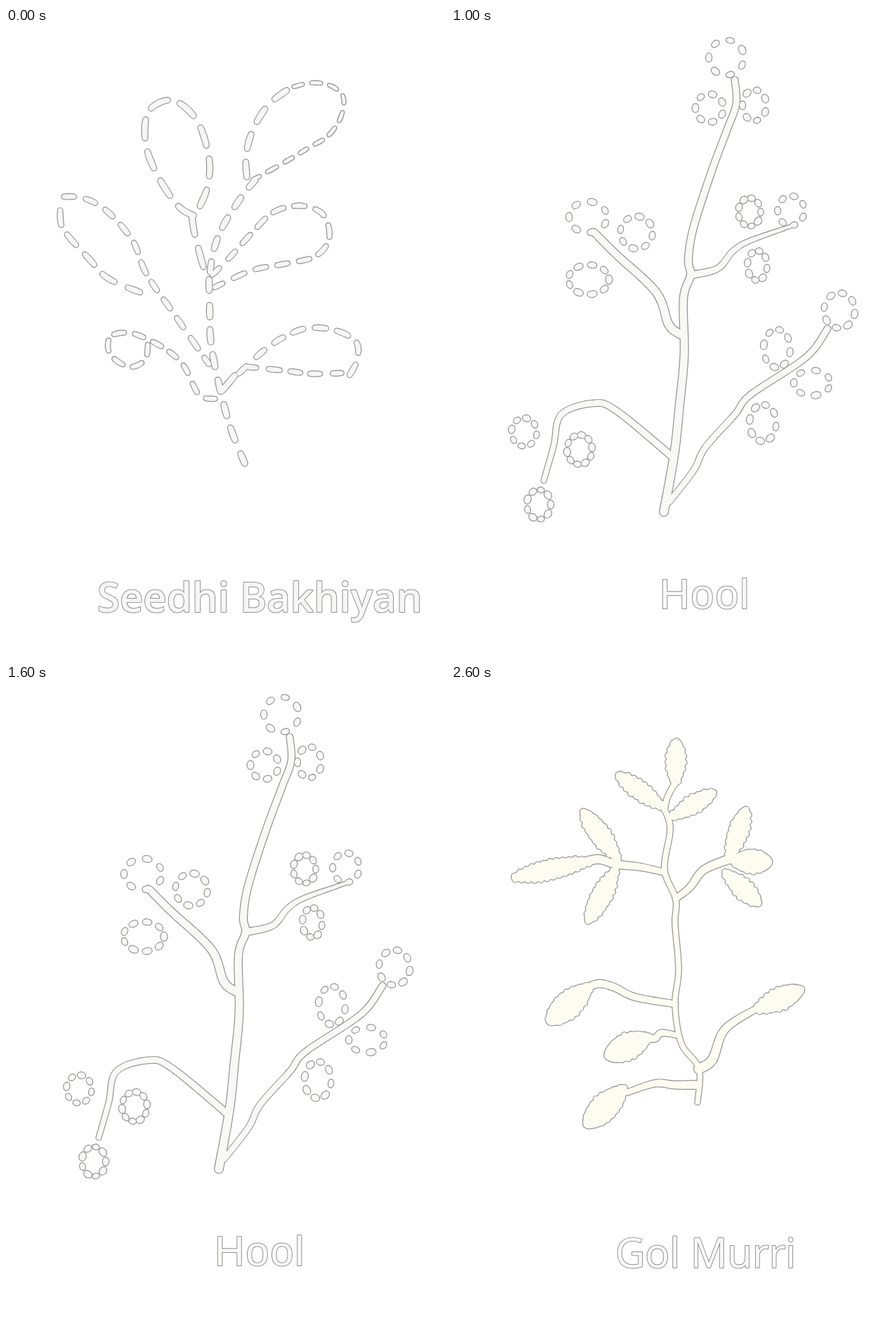
Animation, 625 px wide and 895 px high, one loop 3000 ms. Source, as an HTML page with a canvas:

```html
<!DOCTYPE html>
<html lang="en">
<head>
<meta charset="utf-8">
<title>Embroidery stitches</title>
<style>
  html, body { margin: 0; width: 100%; height: 100%; overflow: hidden; background: #fff; }
  canvas { display: block; }
</style>
</head>
<body>
<canvas width="625" height="895"></canvas>
<script>
const ctx = document.querySelector('canvas').getContext('2d');
const OUTLINE = '#929295';
let shapes = [];  // each shape is a list of discs [x, y, r]
let seed = 1;

const random = () => (seed = seed * 16807 % 2147483647) / 2147483647;
const mix = (a, b, t) => a + (b - a) * t;
const spline = (a, b, c, d, t) =>
  b + t / 2 * (c - a + t * (2 * a - 5 * b + 4 * c - d + t * (3 * (b - c) + d - a)));

// Points about one pixel apart on a smooth curve through "x y x y ..." knots.
function curve(text) {
  const values = text.split(/\s+/).map(Number), knots = [], points = [];
  for (let i = 0; i < values.length; i += 2) knots.push([values[i], values[i + 1]]);
  for (let i = 0; i + 1 < knots.length; i++) {
    const b = knots[i], c = knots[i + 1], a = knots[i - 1] || b, d = knots[i + 2] || c;
    const steps = Math.ceil(Math.hypot(c[0] - b[0], c[1] - b[1]));
    for (let s = 0; s < steps; s++) {
      points.push([0, 1].map(k => spline(a[k], b[k], c[k], d[k], s / steps)));
    }
  }
  return points;
}

function limb(from, to, text) {
  shapes.push(curve(text).map(([x, y], i, all) => [x, y, mix(from, to, i / all.length)]));
}

// Evenly spaced oval stitches that fill the whole curve.
function stitches(count, r, text) {
  const points = curve(text), gap = 0.25, period = points.length / (count - gap);
  for (let i = 0; i < count; i++) {
    const dash = points.slice(Math.round(i * period + r), Math.round((i + 1 - gap) * period - r) + 1);
    shapes.push(dash.map(([x, y], j) => [x, y, r * (0.88 + 0.12 * Math.sin(Math.PI * j / dash.length))]));
  }
}

// Seeds of slightly uneven size along an ellipse.
function ring(count, cx, cy, rx, ry) {
  for (let i = 0; i < count; i++) {
    const size = mix(4.1, 5.2, random()), seedShape = [];
    for (let k = -1; k <= 1; k += 0.25) {
      const angle = (i + 0.25) / count * 2 * Math.PI - Math.PI / 2 + k * 0.1;
      seedShape.push([cx + rx * Math.cos(angle), cy + ry * Math.sin(angle), size - Math.abs(k) * 0.7]);
    }
    shapes.push(seedShape);
  }
}

// A leaf from base to tip, widest past the middle, with a bumpy edge.
function leaf(x1, y1, x2, y2, width) {
  const length = Math.hypot(x2 - x1, y2 - y1), nx = (y1 - y2) / length, ny = (x2 - x1) / length;
  const discs = [];
  for (let s = 0; s <= length; s++) {
    const t = s / length, x = mix(x1, x2, t), y = mix(y1, y2, t);
    const r = mix(4.5, width, Math.sin(Math.PI * t ** 1.15) ** 0.8);
    discs.push([x, y, r]);
    if (s % 9 === 4) {
      for (const side of [-1, 1]) {
        const reach = side * (r - 3.5 + random() * 1.8);
        discs.push([x + nx * reach, y + ny * reach, 4.3]);
      }
    }
  }
  shapes.push(discs);
}

// All outlines first, then all fills, so that touching shapes merge.
function paint(fill) {
  for (const [color, grow] of [[OUTLINE, 0.6], [fill, -0.6]]) {
    ctx.fillStyle = color;
    for (const discs of shapes) {
      const path = new Path2D();
      for (const [x, y, r] of discs) {
        path.moveTo(x + r + grow, y);
        path.arc(x, y, r + grow, 0, 2 * Math.PI);
      }
      ctx.fill(path);
    }
  }
}

function label(text, x, y, font, fill, spacing = 0) {
  ctx.font = font;
  ctx.letterSpacing = spacing + 'px';
  ctx.lineJoin = 'round';
  ctx.lineWidth = 2;
  ctx.strokeStyle = OUTLINE;
  ctx.strokeText(text, x, y);
  ctx.fillStyle = fill;
  ctx.fillText(text, x, y);
}

function seedhiBakhiyan() {
  stitches(2, 4.6, '282 343 275 318 268 290 264 264');
  stitches(9, 4.6, '270 268 246 254 217 212 199 165 203 119 237 103 272 132 289 185 287 225 275 256');
  stitches(5, 4.6, '290 350 296 315 310 280 337 238 357 214');
  stitches(4, 4.6, '343 215 342 180 352 144 373 110 402 87');
  stitches(11, 3.1, '408 84 435 78 462 82 480 98 477 126 459 153 430 171 395 192 350 217');
  stitches(14, 3.9, '292 353 318 327 347 295 381 262 420 253 452 266 460 300 440 325 400 335 350 345 295 370');
  stitches(11, 4.1, '80 240 110 242 143 260 180 302 200 350 240 408 290 480');
  stitches(5, 4.3, '77 257 79 281 92 300 118 328 145 356 193 377');
  stitches(11, 3.8, '202 448 198 472 175 482 148 464 149 439 177 434 208 446 233 461 254 482 275 522 300 528');
  stitches(8, 4.2, '330 493 367 459 397 439 430 427 468 430 498 446 500 472 488 496');
  stitches(5, 4, '480 491 435 492 400 488 342 482');
  stitches(8, 4.8, '289 355 290 400 292 450 305 515 320 570 341 622');
  stitches(1, 4.8, '328 492 305 519');
  paint('#f6f6f4');
  label('Seedhi Bakhiyan', 130, 831, '600 58px "Open Sans", sans-serif', '#f6f6f4');
}

function hool() {
  limb(5, 6.5, '404 74 406 108 393 145 371 204 345 285 338 330 341 352 331 385 332 465 325 540 318 605 303 689');
  limb(5.5, 2.8, '345 351 380 342 401 318 425 303 484 282');
  limb(5.5, 6.5, '205 292 235 322 292 376 310 422 327 436');
  limb(4, 5.5, '132 644 146 595 157 550 203 534 236 545 315 610');
  limb(5, 4.5, '536 428 516 458 490 480 425 523 404 550 362 597 345 630 310 675');
  ring(7, 392, 42, 25, 25);
  ring(7, 368, 114, 20, 20);
  ring(7, 432, 110, 17, 22);
  ring(7, 195, 269, 27, 22);
  ring(8, 264, 291, 23, 23);
  ring(9, 196, 358, 29, 21);
  ring(9, 425, 262, 16, 20);
  ring(7, 484, 260, 19, 21);
  ring(8, 436, 338, 14, 21);
  ring(8, 553, 402, 22, 25);
  ring(8, 464, 456, 19, 27);
  ring(7, 514, 505, 26, 18);
  ring(8, 444, 562, 19, 26);
  ring(8, 104, 575, 18, 20);
  ring(10, 183, 600, 18, 21);
  ring(9, 125, 678, 17, 21);
  paint('#f8f8f5');
  label('Hool', 297, 826, '59px "Liberation Sans", Arial, sans-serif', '#fafaf9', 2);
}

function golMurri() {
  limb(4.5, 4.2, '304 176 312 205 304 262 320 305 319 340 324 405 319 455 328 510 353 546 351 594');
  limb(4.5, 4.5, '304 178 308 160 318 141');
  limb(5, 7, '302 266 270 259 235 255 210 248 185 253');
  limb(5, 7, '320 304 340 288 360 263 398 247');
  limb(5, 6, '319 454 262 444 232 430 210 425 188 433');
  limb(4, 6, '325 499 300 495 290 503 276 500');
  limb(6.5, 4.5, '348 569 318 569 290 567 250 580');
  limb(7.5, 5, '353 546 372 533 390 490 434 461');
  leaf(319, 141, 321, 80, 14);
  leaf(302, 174, 238, 128, 13);
  leaf(314, 188, 374, 153, 13);
  leaf(200, 250, 90, 274, 14);
  leaf(238, 248, 188, 180, 14.5);
  leaf(235, 262, 195, 336, 14.5);
  leaf(396, 246, 420, 177, 14);
  leaf(400, 250, 453, 252, 17);
  leaf(390, 266, 438, 311, 14);
  leaf(198, 428, 140, 479, 19);
  leaf(282, 500, 223, 528, 19);
  leaf(247, 573, 193, 626, 19);
  leaf(434, 462, 499, 433, 16);
  paint('#fcfdf0');
  label('Gol Murri', 234, 829, '58px "Open Sans", "Noto Sans", sans-serif', '#fafafa');
}

const scenes = [seedhiBakhiyan, hool, golMurri];
const start = performance.now();
let shown = -1;

function tick() {
  const index = Math.floor((performance.now() - start) % 3000 / 1000);
  if (index !== shown) {
    shown = index;
    shapes = [];
    seed = 7;
    ctx.clearRect(0, 0, 625, 895);
    scenes[index]();
  }
  requestAnimationFrame(tick);
}
tick();
</script>
</body>
</html>
```
